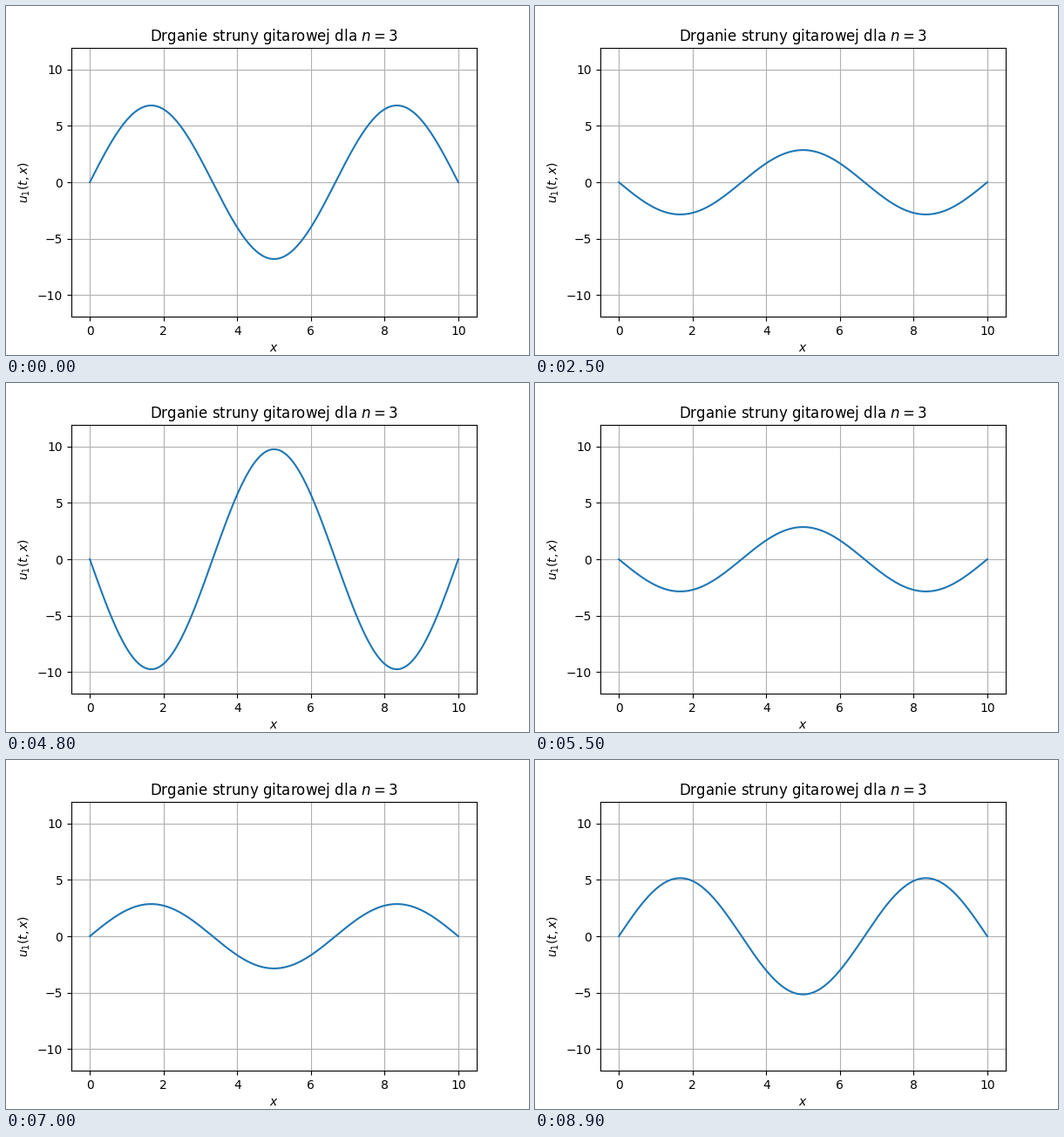
Animation of 600x400 px, one loop 9000 ms. Source, as a matplotlib script:

```python
import matplotlib.pyplot as plt
import numpy as np
from matplotlib.animation import FuncAnimation

LENGTH = 10
MODE = 3
FRAMES = 90
PERIOD = 30  # frames per oscillation
A, B = 6.8, 7.22  # cosine and sine amplitudes

x = np.linspace(0, LENGTH, 200)
shape = np.sin(MODE * np.pi * x / LENGTH)


def displacement(frame):
    phase = 2 * np.pi * frame / PERIOD
    return (A * np.cos(phase) + B * np.sin(phase)) * shape


fig, ax = plt.subplots(figsize=(6, 4), dpi=100)
line, = ax.plot(x, displacement(0))
limit = 1.2 * np.hypot(A, B)
ax.set_ylim(-limit, limit)
ax.set_title(f"Drganie struny gitarowej dla $n={MODE}$")
ax.set_xlabel("$x$")
ax.set_ylabel("$u_1(t,x)$")
ax.grid()


def update(frame):
    line.set_ydata(displacement(frame))
    return line,


anim = FuncAnimation(fig, update, frames=FRAMES, interval=100, repeat=True)
plt.show()
```
